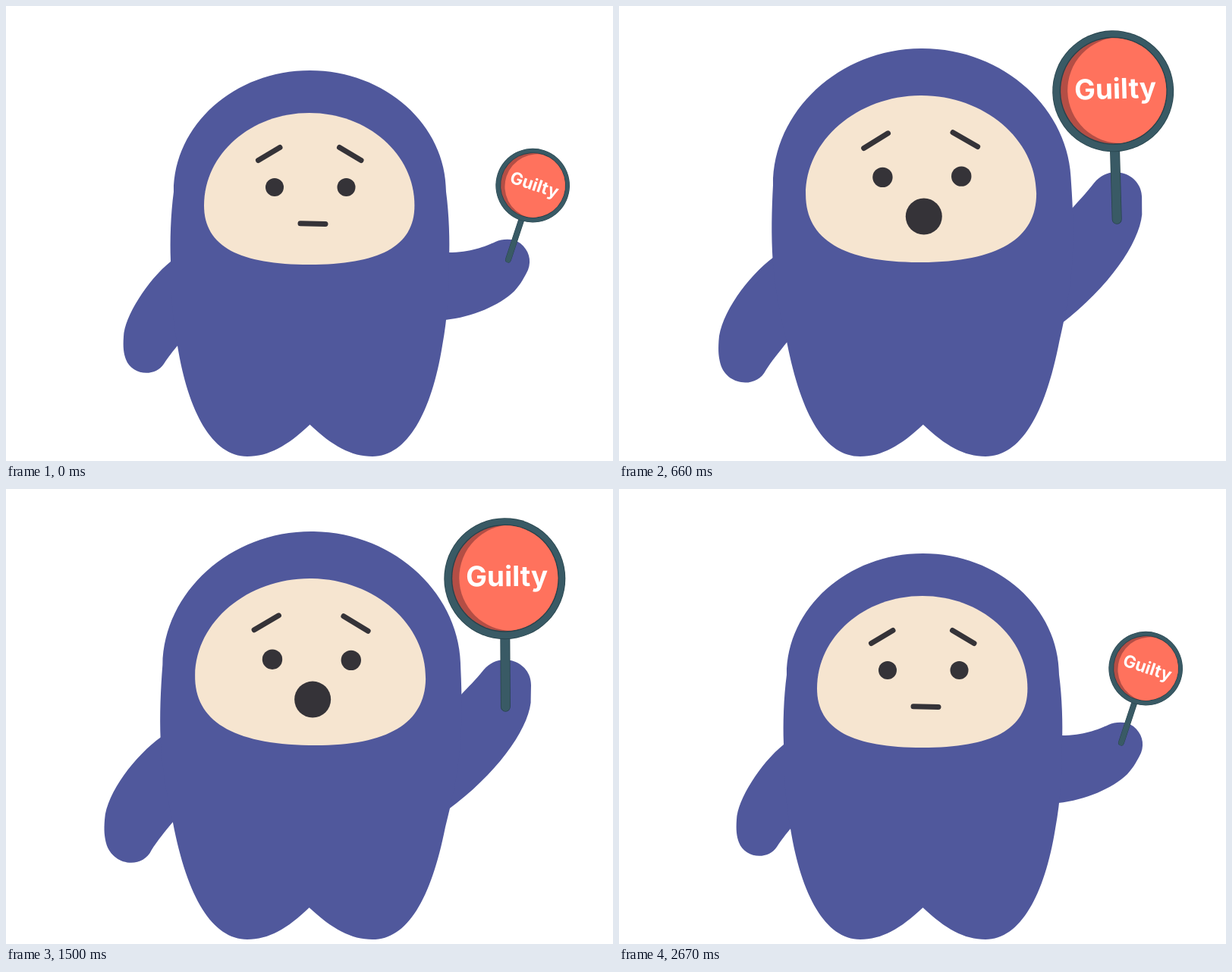
An HTML page with a canvas for the animation above (2.7 s loop, 800 px wide and 600 px high).

```html
<!DOCTYPE html>
<html lang="en">
<head>
<meta charset="utf-8">
<title>Guilty sign</title>
<style>
  html, body { margin: 0; width: 100%; height: 100%; overflow: hidden; background: #fff; }
  canvas { display: block; width: 800px; height: 600px; }
</style>
</head>
<body>
<canvas id="stage" width="800" height="600"></canvas>
<script>
const ctx = document.getElementById('stage').getContext('2d');
const LOOP = 2700, STEP = 30, DEG = Math.PI / 180, TAU = Math.PI * 2;
const BLUE = '#50589c', SKIN = '#f6e5d0', INK = '#353338';
const TEAL = '#395a65', TEAL_DARK = '#27434c', CORAL = '#ff725d', CORAL_DARK = '#b44e45';

// Each shape: [rest, raised], as a start point followed by cubic segments.
const BODY = [
  [400.5,85, 301,85, 221,157, 221,245, 217,275, 216,310, 217,335,
   217,375, 219,410, 226,448, 240,535, 272,594, 318,594, 346,594, 371,580, 400.5,552],
  [400.5,56, 292,56, 204,138, 204,235, 202,268, 201,300, 203,335,
   206,375, 212,405, 221,443, 240,540, 272,594, 318,594, 346,594, 371,580, 400.5,552]
];
const FACE = [
  [399.7,141, 323,141, 261,195, 261,263, 261,318, 309,341, 399.7,341],
  [399,118, 316,118, 247,176, 247,248, 247,308, 298,338, 399,338]
];
const LEFT_ARM = [
  [217,337, 186,362, 156,410, 155,436, 154,450, 155,458, 158,466,
   166,487, 196,490, 208,472, 215,461, 221,454, 226,448],
  [204,330, 170,355, 133,405, 131,440, 130,455, 131,461, 133,470,
   141,500, 181,504, 193,479, 200,468, 212,453, 221,442]
];
const RIGHT_ARM = [
  [583,325, 612,325, 632,317, 645,311, 655,307, 668,306, 678,313,
   689,322, 693,335, 688,348, 683,358, 679,366, 670,376, 650,395, 615,410, 579,414],
  [598,268, 608,257, 616,249, 627,235, 637,223, 650,219, 664,222,
   680,226, 690,239, 690,254, 690,264, 690,268, 690,277, 686,315, 645,373, 583,420]
];
const SHOULDER = [545, 350];

const clamp01 = v => Math.max(0, Math.min(1, v));
const mix = (a, b, k) => a + (b - a) * k;
const smooth = v => { v = clamp01(v); return v * v * (3 - 2 * v); };
const pairs = list => list.reduce((out, v, i) => (i % 2 ? out[out.length - 1].push(v) : out.push([v]), out), []);

function mixPoint(a, b, k) {
  return [mix(a[0], b[0], k), mix(a[1], b[1], k)];
}

// Blends two points along an arc about the shoulder.
function swingPoint(a, b, k) {
  const polar = p => {
    const x = p[0] - SHOULDER[0], y = p[1] - SHOULDER[1];
    return [Math.hypot(x, y), Math.atan2(y, x)];
  };
  const [dist, ang] = mixPoint(polar(a), polar(b), k);
  return [SHOULDER[0] + dist * Math.cos(ang), SHOULDER[1] + dist * Math.sin(ang)];
}

function poseAt(t) {
  const raise = smooth(t / 300) - smooth((t - 1500) / 300);
  const tremble = Math.cos(TAU * (t - 1260) / 130) + 0.355;
  const breath = t > 1800 ? Math.sin(Math.PI * (t - 1800) / 900) ** 2 : 0;
  return { raise, tilt: raise * tremble * DEG, stretch: breath * 0.016 };
}

// Tilts and stretches the upper body while the feet stay planted.
function warp([x, y], pose) {
  const hold = clamp01((594 - y) / 140);
  const a = pose.tilt * hold, c = Math.cos(a), s = Math.sin(a);
  const dx = x - 400;
  const dy = 400 + (y - 400) * (1 + pose.stretch * hold) - 380;
  return [400 + dx * c - dy * s, 380 + dx * s + dy * c];
}

function blend(shape, pose, mixer = mixPoint) {
  const raised = pairs(shape[1]);
  return pairs(shape[0]).map((p, i) => mixer(p, raised[i], pose.raise));
}

function mirrored(half) {
  const axis = half[0][0];
  return half.concat(half.slice(0, -1).reverse().map(([x, y]) => [2 * axis - x, y]));
}

function fillShape(points, color, pose, anchor) {
  const p = points.map(q => warp(q, pose));
  ctx.beginPath();
  ctx.moveTo(...p[0]);
  for (let i = 1; i < p.length; i += 3) ctx.bezierCurveTo(...p[i], ...p[i + 1], ...p[i + 2]);
  if (anchor) ctx.lineTo(...anchor);
  ctx.closePath();
  ctx.fillStyle = color;
  ctx.fill();
}

function disc(x, y, r, color) {
  ctx.beginPath();
  ctx.arc(x, y, r, 0, TAU);
  ctx.fillStyle = color;
  ctx.fill();
}

function bar(from, to, width, color) {
  ctx.beginPath();
  ctx.moveTo(...from);
  ctx.lineTo(...to);
  ctx.lineWidth = width;
  ctx.lineCap = 'round';
  ctx.strokeStyle = color;
  ctx.stroke();
}

function drawFeatures(pose) {
  const at = (rest, raised) => warp(mixPoint(rest, raised, pose.raise), pose);
  const eye = mix(12, 13.2, pose.raise);
  disc(...at([354, 239], [348.5, 225.5]), eye, INK);
  disc(...at([448.5, 239], [452.3, 225]), eye, INK);
  bar(at([332.5, 203.5], [324, 187]), at([361, 186.5], [356, 167.5]), 7, INK);
  bar(at([439.5, 186.5], [441.5, 167]), at([468, 203.5], [474, 186]), 7, INK);
  if (pose.raise > 0.5) {
    disc(...at([402.5, 286], [402.5, 277.5]), mix(22, 24, pose.raise), INK);
  } else {
    bar(at([388, 286.8], [385, 278.5]), at([421, 287.4], [424, 279.2]), 7, INK);
  }
}

function drawSign(pose) {
  const grip = warp(swingPoint([661, 337.5], [657, 288], pose.raise), pose);
  const size = mix(0.61, 1, pose.raise);
  ctx.save();
  ctx.translate(...grip);
  ctx.rotate(mix(18.2, -1.3, pose.raise) * DEG + pose.tilt);
  ctx.scale(size, size);
  ctx.translate(0, -174);

  bar([0, 76], [0, 169], 13, TEAL_DARK);
  bar([0, 76], [0, 169], 11.5, TEAL);
  disc(0, 0, 80, TEAL_DARK);
  disc(0, 0, 79.2, TEAL);
  disc(0.5, -0.5, 71, TEAL_DARK);
  disc(0.5, -0.5, 69.6, CORAL_DARK);
  ctx.save();
  ctx.beginPath();
  ctx.arc(0.5, -0.5, 69.6, 0, TAU);
  ctx.clip();
  disc(10, -1, 70, CORAL);
  ctx.restore();

  ctx.fillStyle = '#fff';
  ctx.font = '700 37px Inter, "Open Sans", sans-serif';
  ctx.textAlign = 'center';
  ctx.textBaseline = 'alphabetic';
  ctx.fillText('Guilty', 3, 10);
  ctx.restore();
}

function draw(t) {
  const pose = poseAt(t);
  ctx.fillStyle = '#fff';
  ctx.fillRect(0, 0, 800, 600);
  fillShape(blend(LEFT_ARM, pose), BLUE, pose, [300, 390]);
  fillShape(blend(RIGHT_ARM, pose, swingPoint), BLUE, pose, [500, 350]);
  fillShape(mirrored(blend(BODY, pose)), BLUE, pose);
  fillShape(mirrored(blend(FACE, pose)), SKIN, pose);
  drawFeatures(pose);
  drawSign(pose);
}

const start = performance.now();
function tick() {
  const t = (performance.now() - start) % LOOP;
  draw(Math.floor(t / STEP) * STEP);
  requestAnimationFrame(tick);
}
tick();
</script>
</body>
</html>
```
